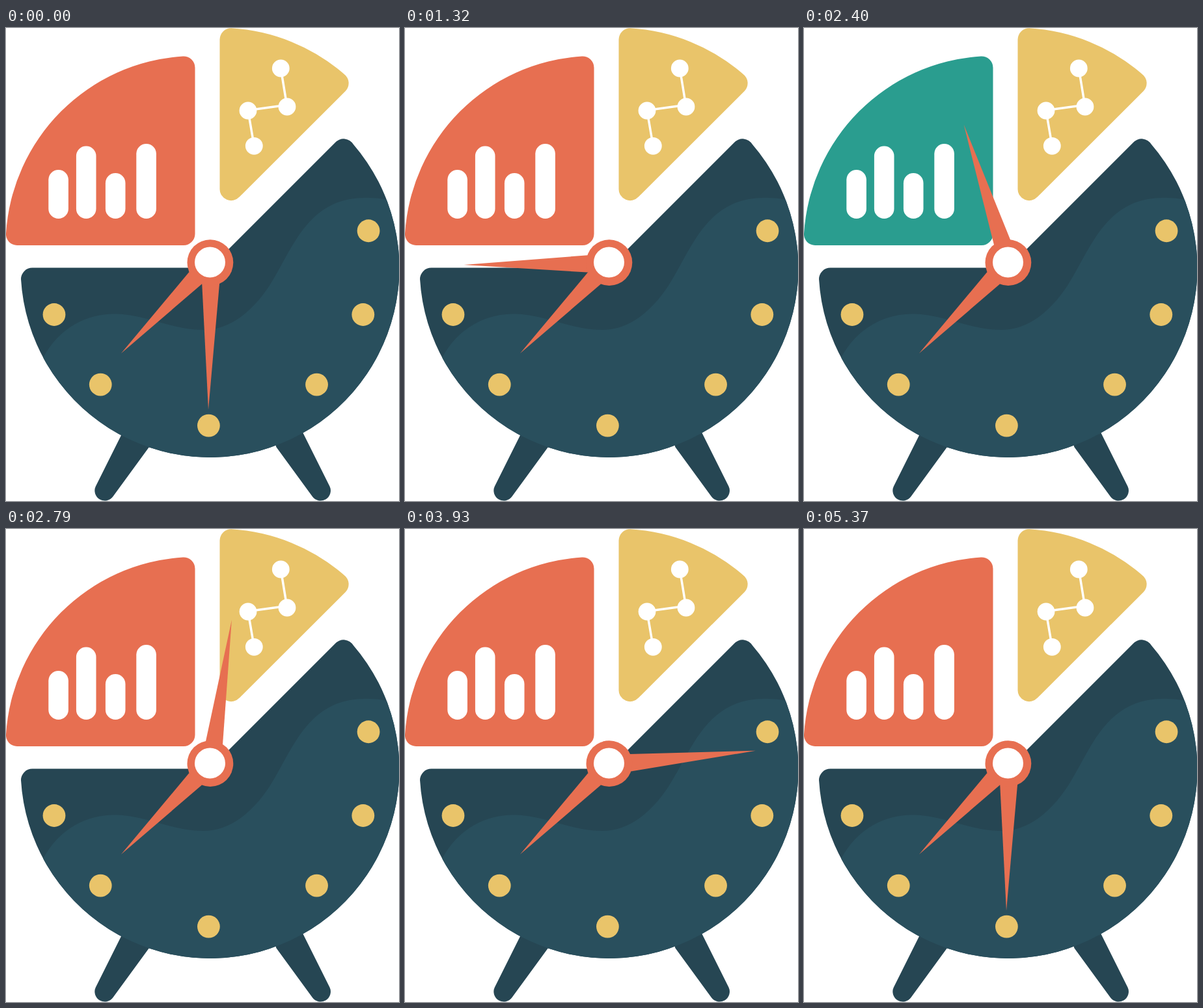
An HTML page that plays this animation: 604x727 px, repeating every 5400 ms.

```html
<!DOCTYPE html>
<html lang="en">
<head>
<meta charset="utf-8">
<title>Clock chart</title>
<style>
  html, body { margin: 0; width: 100%; height: 100%; overflow: hidden; background: #fff; }
  svg { display: block; width: 604px; height: 727px; }
  .dark { fill: #264653; }
  .orange { fill: #e76f51; }
  .yellow { fill: #e9c46a; }
  .white { fill: #fff; }
  #nodes circle { r: 13.4px; }
  #dots circle { r: 17.4px; }
</style>
</head>
<body>
<svg viewBox="0 0 604 727">
  <defs>
    <path id="body" d="M40.5 368.5H313.5L506 176A17.5 17.5 0 0 1 534 179A291 291 0 1 1 23 386A17.5 17.5 0 0 1 40.5 368.5Z"/>
    <path id="leg" d="M177 626L137.8 704.5A15.5 15.5 0 0 0 164.5 720L220 644L230 600H190Z"/>
    <clipPath id="face"><use href="#body"/></clipPath>
  </defs>

  <g class="dark">
    <use href="#leg"/>
    <use href="#leg" transform="translate(635.3) scale(-1 1)"/>
    <use href="#body"/>
  </g>
  <path clip-path="url(#face)" fill="#294f5d" d="M57 507C82 460 125 439 168 439.5C215 440 255 464 303 464C345 464 378 436 405 396C440 342 462 261 552 261Q570 260.5 586 264H620V680H0V507Z"/>
  <g id="dots" class="yellow"></g>

  <path id="quarter" class="orange" d="M0 316A291 291 0 0 1 272 43.5A17.5 17.5 0 0 1 290.5 61V316.5A17.5 17.5 0 0 1 273 334H17A17 17 0 0 1 0 316Z"/>
  <g id="bars" class="white"></g>

  <path class="yellow" d="M328.5 17.5A17.5 17.5 0 0 1 346 .3A291 291 0 0 1 519.5 70.7A17.5 17.5 0 0 1 521.7 97L358.8 259.6A17.5 17.5 0 0 1 328.5 247Z"/>
  <path d="M422.3 62L432 121M432 118.2L372 126.4M372 127L381.3 181.3" fill="none" stroke="#fff" stroke-width="3.5"/>
  <g id="nodes" class="white">
    <circle cx="422.3" cy="62"/>
    <circle cx="432" cy="121"/>
    <circle cx="372" cy="127"/>
    <circle cx="381.3" cy="181.3"/>
  </g>

  <g class="orange">
    <path d="M177 500L281.5 375L301 393.5Z"/>
    <path id="hand" d="M0 224.7L-13.4 31L-13.8 22H13.8L13.4 31Z"/>
    <circle cx="313.9" cy="360.6" r="35.4"/>
  </g>
  <circle class="white" cx="313.5" cy="360" r="23.5"/>
</svg>
<script>
  const $ = id => document.getElementById(id);

  // Hour dots fan out from the bottom of the dial, three to the right and two to the left.
  for (let k = -2; k <= 3; k++) {
    const angle = Math.sign(k) * (11.7 + 29.85 * Math.abs(k)) * Math.PI / 180;
    const x = 311.4 + 250.5 * Math.sin(angle), y = 360.6 + 250.5 * Math.cos(angle);
    $('dots').innerHTML += `<circle cx="${x}" cy="${y}"/>`;
  }

  // Bars share a baseline, and the gaps widen slightly to the right.
  [75, 111.5, 70, 115].forEach((height, i) => {
    const x = 65.3 + 41.4 * i + 1.2 * i * i;
    $('bars').innerHTML += `<rect x="${x}" y="${293 - height}" width="30.6" height="${height}" rx="15.3"/>`;
  });

  const STEP = 30, STEPS = 180;
  const start = performance.now();

  function draw() {
    const step = Math.floor((performance.now() - start) / STEP) % STEPS;
    const turn = 360 * step / (STEPS - 1);
    $('hand').setAttribute('transform', `translate(315.2 362.2) rotate(${turn + 1.07})`);
    // The quarter turns green while the hand sweeps over it.
    $('quarter').style.fill = turn >= 90 && turn < 180 ? '#2a9d8f' : '';
    requestAnimationFrame(draw);
  }
  draw();
</script>
</body>
</html>
```
